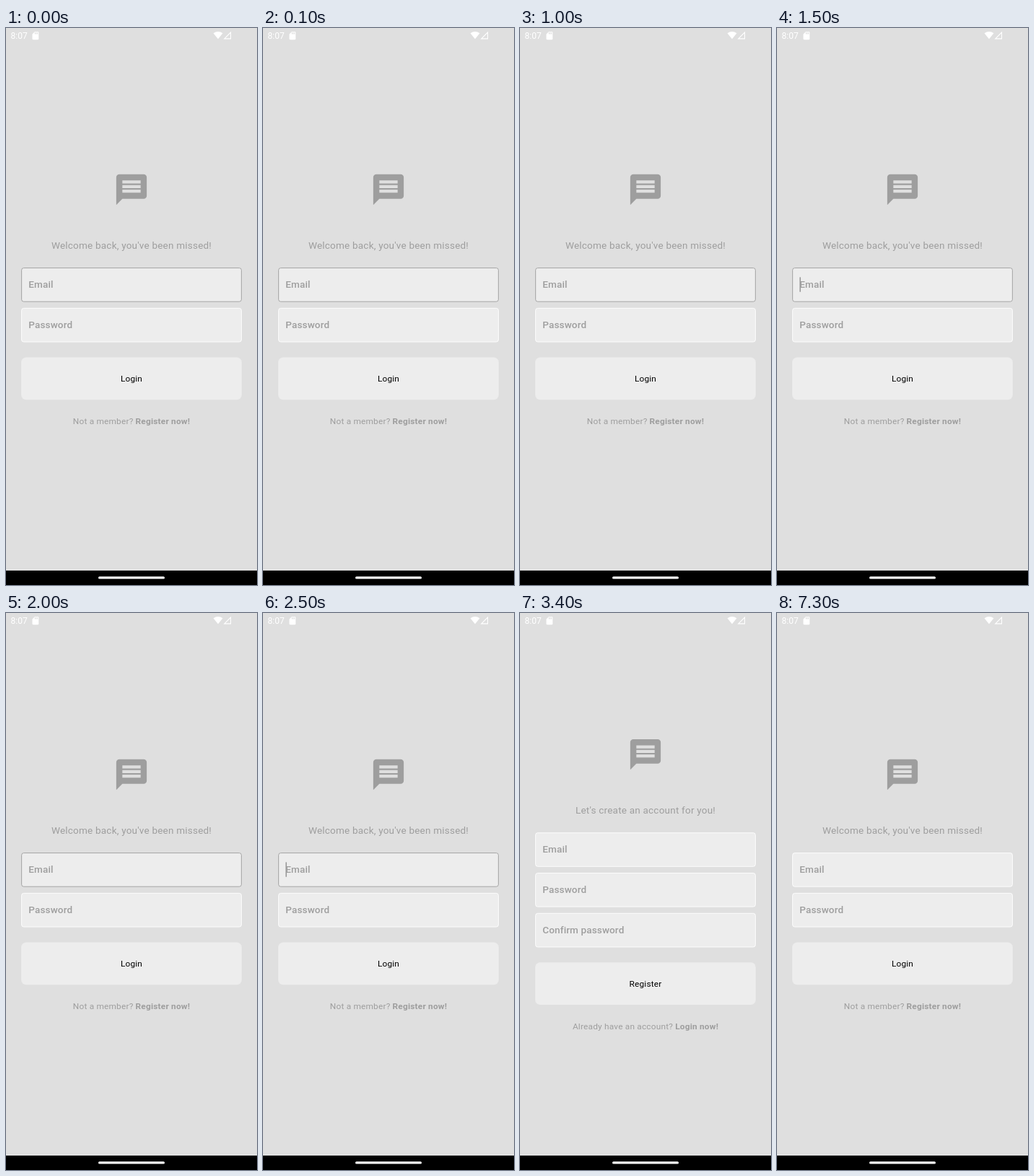
Animation of 348 by 772 pixels, one loop 8 s. Source, as an HTML page:

```html
<!DOCTYPE html>
<html lang="en">
<head>
<meta charset="utf-8">
<title>Sign in</title>
<style>
  html, body { margin: 0; width: 100%; height: 100%; overflow: hidden; background: #dfdfdf; }
  svg { display: block; width: 348px; height: 772px; }
  text { font-family: Roboto, "Open Sans", sans-serif; fill: #9e9e9e; letter-spacing: .211px; }
  .title { font-size: 13.53px; text-anchor: middle; }
  .hint { font-size: 13.53px; font-weight: 500; letter-spacing: .127px; }
  .small { font-size: 11.84px; text-anchor: middle; }
  .action { fill: #000; }
  .bold { font-weight: 700; }
  .field { fill: #ededed; stroke: #fff; stroke-width: .9; }
  .focus { stroke: #9e9e9e; }
  .clock { font-size: 12px; fill: #fff; letter-spacing: 0; }
</style>
</head>
<body>
<svg viewBox="0 0 348 772">
  <rect width="348" height="772" fill="#dfdfdf"/>
  <g fill="#fff">
    <text class="clock" x="6.6" y="15">8:07</text>
    <path transform="translate(34.3 4.1) scale(.55)" d="M18 2h-8L4 8v12c0 1.1.9 2 2 2h12c1.1 0 2-.9 2-2V4c0-1.1-.9-2-2-2zm-6 6h-2V4h2zm3 0h-2V4h2zm3 0h-2V4h2z"/>
    <path d="M294 15.3 287.5 7.3Q294 2.7 300.5 7.3Z"/>
    <path d="M311.5 6.2V14.9H302.8Z" fill="none" stroke="#fff" stroke-width="1.1"/>
  </g>
  <g id="login"></g>
  <g id="register"></g>
  <rect id="cursor" x="31.3" y="345.4" width="1.7" height="20.3" fill="#9e9e9e"/>
  <rect y="752" width="348" height="20"/>
  <rect x="128" y="760.3" width="92" height="3.2" rx="1.6" fill="#fff"/>
</svg>
<script>
const $ = id => document.getElementById(id);
const LOOP = 8000, TO_REGISTER = 3400, TO_LOGIN = 7300, BLINK = 500, LAST_BLINK = 3000;
const STEP = 55.8; // distance between stacked fields

const field = (hint, y) => `
  <rect class="field" x="21.6" y="${y + .4}" width="304.8" height="46.6" rx="3"/>
  <text class="hint" x="31.3" y="${y + 27.9}">${hint}</text>`;

// The column is centred, so each extra field lifts the top by half a step.
function screen({ title, hints, action, ask, link }) {
  const extra = (hints.length - 2) * STEP;
  return `<g transform="translate(0 ${-extra / 2})">
    <path transform="translate(148.64 198.64) scale(2.113)" fill="#9e9e9e"
      d="M20 2H4c-1.1 0-2 .9-2 2v18l4-4h14c1.1 0 2-.9 2-2V4c0-1.1-.9-2-2-2zm-2 12H6v-2h12zm0-3H6V9h12zm0-3H6V6h12z"/>
    <text class="title" x="174" y="306">${title}</text>
    ${hints.map((hint, i) => field(hint, 332.2 + i * STEP)).join("")}
    <g transform="translate(0 ${extra})">
      <rect x="21.1" y="456.4" width="305.7" height="58.8" rx="6.8" fill="#ededed"/>
      <text class="small action" x="174" y="489.9">${action}</text>
      <text class="small" x="174" y="549">${ask} <tspan class="bold">${link}</tspan></text>
    </g>
  </g>`;
}

$("login").innerHTML = screen({
  title: "Welcome back, you've been missed!", hints: ["Email", "Password"],
  action: "Login", ask: "Not a member?", link: "Register now!"
});
$("register").innerHTML = screen({
  title: "Let's create an account for you!", hints: ["Email", "Password", "Confirm password"],
  action: "Register", ask: "Already have an account?", link: "Login now!"
});

const email = $("login").querySelector(".field");
const show = (node, on) => { node.style.display = on ? "" : "none"; };

function draw(now) {
  const t = now % LOOP;
  const registering = t >= TO_REGISTER && t < TO_LOGIN;
  show($("login"), !registering);
  show($("register"), registering);
  show($("cursor"), t < LAST_BLINK && Math.floor(t / BLINK) % 2 === 1);
  email.classList.toggle("focus", t < TO_REGISTER);
}

const start = performance.now();
function tick() {
  draw(performance.now() - start);
  requestAnimationFrame(tick);
}
tick();
</script>
</body>
</html>
```
